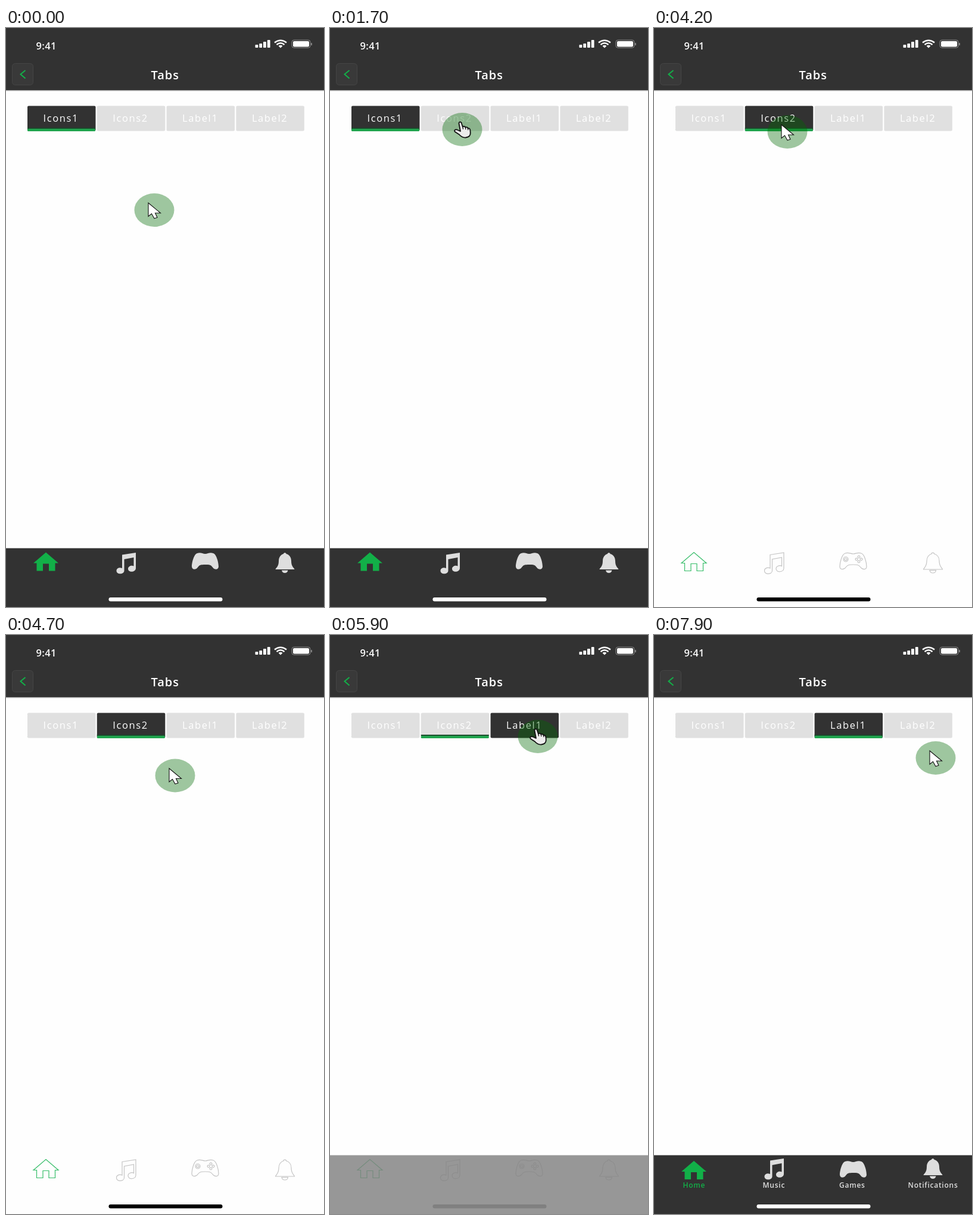
Write an HTML page that moves like this. It is 534 by 970 pixels and loops after 8 s.

```html
<!DOCTYPE html>
<html lang="en">
<head>
<meta charset="utf-8">
<title>Tabs</title>
<style>
  html, body { margin: 0; width: 100%; height: 100%; overflow: hidden; background: #fefefe; }
  svg { display: block; width: 100%; height: 100%; }
  text { font-family: "Open Sans", "Noto Sans", sans-serif; fill: #fff; }
  .title { font-size: 20px; font-weight: 600; letter-spacing: 1px; }
  .clock { font-size: 16.5px; font-weight: 600; letter-spacing: .4px; }
  .tab text { font-size: 16.5px; letter-spacing: 1.6px; }
  .tab rect { fill: #e0e0e0; }
  .tab.on rect { fill: #323232; }
  .label { font-size: 12px; font-weight: 600; letter-spacing: .75px; fill: #e0e0e0; }
  .solid { fill: #dedede; }
  .solid .hole { fill: #323232; }
  .solid .home, .label.home { fill: #12b048; }
  .line { fill: none; stroke: #c4c4c4; stroke-width: 1.2; }
  .line .home { stroke: #35bd68; }
</style>
</head>
<body>
<svg viewBox="0 0 534 970">
  <defs>
    <path id="home" d="M46 896.5L67 878.5L88 896.5H82.500V909.500H72V897.500H62V909.500H51.500V896.500Z"/>
    <path id="music" d="M195 882.500L218 879V905C218 912 205 913 205 906C205 901.500 211 899.500 214.500 901.500V887L198.500 890V909C198.500 916 185.500 916 185.500 909.500C185.500 904.500 191 903 195 905Z"/>
    <g id="pad">
      <path d="M321 880C327 878 330 881 334.500 881C339 881 342 878 348 880C354 882 357 897 357 902C357 908 350 908 347 903.500C344 899.500 342 899 334.500 899C327 899 325 899.500 322 903.500C319 908 312 908 312 902C312 897 315 882 321 880Z"/>
      <circle class="hole" cx="322" cy="890" r="4"/>
      <circle cx="322" cy="890" r="2"/>
      <g class="hole">
        <circle cx="344" cy="886" r="1.900"/><circle cx="340" cy="890" r="1.900"/>
        <circle cx="348" cy="890" r="1.900"/><circle cx="344" cy="894" r="1.900"/>
      </g>
    </g>
    <path id="bell" d="M452.500 907C453 904 458 903 458 893C458 886 462 882 466 881C466 878.500 470.500 878.500 470.500 881C475 882 479 886 479 893C479 903 484 904 484.500 907ZM463 908.500H473.500C472.500 914.500 464 914.500 463 908.500Z"/>
  </defs>

  <rect width="534" height="970" fill="#fefefe"/>
  <rect width="534" height="104.500" fill="#323232"/>
  <path d="M0 105H534" stroke="#b5b5b5"/>

  <text class="clock" x="50.500" y="36">9:41</text>
  <g fill="#fff">
    <rect x="418.500" y="28" width="4.800" height="5" rx="1"/>
    <rect x="425.300" y="26" width="4.800" height="7" rx="1"/>
    <rect x="432" y="23" width="4.800" height="10" rx="1"/>
    <rect x="438.800" y="20" width="4.800" height="13" rx="1"/>
    <path d="M457.500 30Q461 27.500 464.500 30L461 33.500Z"/>
    <rect x="482" y="22" width="27" height="9.500" rx="2"/>
  </g>
  <g fill="none" stroke="#fff" stroke-width="2.500">
    <path d="M451 24.500Q461 17 471 24.500M454.500 28Q461 22.500 467.500 28"/>
    <rect x="480" y="20.200" width="31" height="13" rx="3.500" stroke="#8c8c8c" stroke-width="1"/>
    <path d="M513 25V29" stroke="#9a9a9a" stroke-width="1.500"/>
  </g>

  <rect x="10.500" y="59.500" width="35" height="36" rx="5" fill="#393939" stroke="#454545"/>
  <path d="M32.500 71L24.500 77.500L32.500 84.500" fill="none" stroke="#12b048" stroke-width="2"/>
  <text class="title" x="243.500" y="86">Tabs</text>

  <g id="tabs"></g>
  <g id="under">
    <rect x="36" y="167" width="114" height="2" fill="#1c4429"/>
    <rect x="36" y="168.700" width="114" height="4.300" rx="1.500" fill="#20a44e"/>
  </g>

  <rect x="172.500" y="954" width="191" height="6.500" rx="3.200"/>
  <g id="lines" class="line"></g>
  <g id="bar">
    <rect y="871.500" width="534" height="99" fill="#323232"/>
    <rect x="172.500" y="954" width="191" height="6.500" rx="3.200" fill="#fff"/>
  </g>
  <g id="plain" class="solid"></g>
  <g id="named" class="solid"></g>

  <g id="pointer">
    <ellipse rx="33.500" ry="28" fill="rgba(0,105,5,.38)"/>
    <path id="arrow" d="M-10 -12V10.500L-4.500 6L0 14L5 12.500L1.500 5H10.500Z" fill="#fff" stroke="#111" stroke-width="1.100"/>
    <g id="hand" stroke="#111" stroke-width="1.800" stroke-linejoin="round" stroke-linecap="round">
      <path fill="#ececec" d="M-5.500 -10C-5.500 -13.500 -1.500 -13.500 -1 -10L.8 -4.500C2.500 -6 5 -5 5.300 -3.500C7.500 -4.500 9 -3.500 9.500 -2C12 -2.500 13.500 -.5 13.500 2L13.800 6C13.800 11 10 13 6 13.500C1 14 -2 12 -5 8.500L-12 4C-14.500 1.500 -11 -1 -8 .8L-3 3Z"/>
      <path fill="none" stroke-width="1.300" d="M.8 -4.500L1.500 -1M5.300 -3.500L5.800 -.5M9.500 -2L9.800 .5"/>
    </g>
  </g>
</svg>
<script>
  const LOOP = 8000, STEP = 100, PITCH = 116.8;
  const $ = id => document.getElementById(id);
  const icons = ["home", "music", "pad", "bell"];
  const lift = [2.5, -2, 2, -2];

  // time, x, y of the pointer's centre
  const path = [
    [600, 249, 305], [700, 248, 308], [800, 234, 307], [1100, 163, 288],
    [1200, 161, 268], [1300, 168, 244], [1500, 198, 197], [1700, 222, 170],
    [1800, 229, 162], [4100, 229, 162], [4200, 224, 174], [4300, 218, 194],
    [4400, 219, 219], [4500, 233, 240], [4600, 256, 247], [4800, 312, 224],
    [5000, 345, 194], [5200, 344, 179], [5400, 349, 170], [7300, 349, 170],
    [7400, 347, 180], [7500, 352, 217], [7600, 374, 250], [7700, 408, 264],
    [7800, 446, 246], [7900, 473, 206]
  ];
  const handTimes = [[1600, 2200], [2500, 2900], [5200, 6600]];

  const use = (id, dy = 0) =>
    `<use href="#${id}" class="${id}" transform="translate(0 ${dy})"/>`;
  const label = (text, x) =>
    `<text class="label ${text.toLowerCase()}" x="${x}" y="926">${text}</text>`;

  $("tabs").innerHTML = ["Icons1", "Icons2", "Label1", "Label2"].map((text, i) =>
    `<g class="tab" transform="translate(${36 + i * PITCH} 0)">
      <rect y="130.500" width="114.500" height="42" rx="2"/>
      <text x="26.500" y="157">${text}</text></g>`).join("");
  $("lines").innerHTML = $("plain").innerHTML = icons.map(id => use(id)).join("");
  $("named").innerHTML = icons.map((id, i) => use(id, lift[i])).join("") +
    label("Home", 48.5) + label("Music", 182.5) +
    label("Games", 311) + label("Notifications", 426.5);

  const ramp = (t, a, b) => Math.min(1, Math.max(0, (t - a) / (b - a)));
  const stage = (t, a, b) => t < a ? 0 : t < b ? 1 : 2;
  const fade = (id, value) => $(id).setAttribute("opacity", value);
  const move = (id, x, y) => $(id).setAttribute("transform", `translate(${x} ${y})`);

  function pointerAt(t) {
    const next = path.findIndex(p => p[0] > t);
    if (next === 0) return path[0].slice(1);
    if (next < 0) return path[path.length - 1].slice(1);
    const [t0, x0, y0] = path[next - 1], [t1, x1, y1] = path[next];
    const k = ramp(t, t0, t1);
    return [x0 + (x1 - x0) * k, y0 + (y1 - y0) * k];
  }

  function draw(t) {
    const active = stage(t, 2200, 5800);
    [...$("tabs").children].forEach((tab, i) => tab.classList.toggle("on", i === active));
    move("under", stage(t, 2500, 6100) * PITCH, 0);

    const leave = 1 - ramp(t, 2100, 2400);
    fade("plain", leave);
    fade("bar", leave + ramp(t, 5700, 6100));
    fade("lines", ramp(t, 2400, 2900) * (1 - ramp(t, 5700, 6000)));
    fade("named", ramp(t, 6100, 6600));

    move("pointer", ...pointerAt(t));
    const hand = handTimes.some(([a, b]) => t >= a && t < b);
    fade("hand", hand ? 1 : 0);
    fade("arrow", hand ? 0 : 1);
  }

  const start = performance.now();
  function tick() {
    const t = (performance.now() - start) % LOOP;
    draw(Math.floor(t / STEP) * STEP);
    requestAnimationFrame(tick);
  }
  tick();
</script>
</body>
</html>
```
